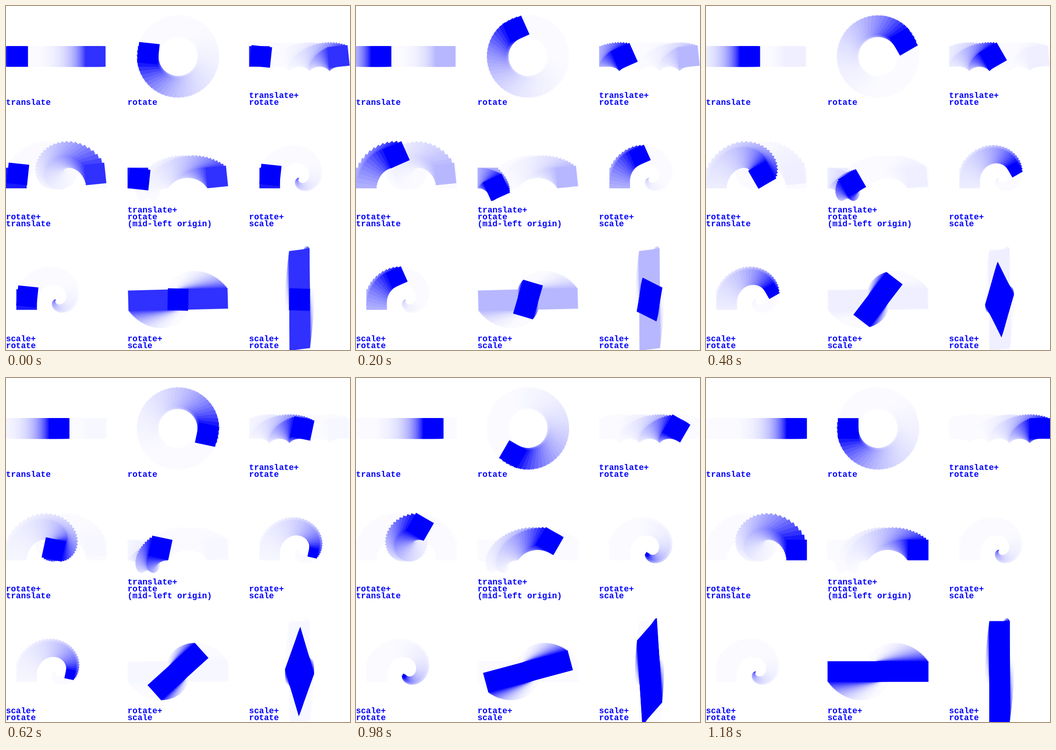
Recreate the animation shown at these times as an HTML page with a canvas. Size 748 by 748 pixels, loop 1200 ms.

```html
<!DOCTYPE html>
<html lang="en">
<head>
<meta charset="utf-8">
<title>Transform order</title>
<style>
  html, body { margin: 0; width: 100%; height: 100%; overflow: hidden; background: #fff; }
  canvas { position: absolute; left: 0; top: 0; }
  .label {
    position: absolute;
    margin: 0;
    transform: translateY(-100%);
    font: bold 18px/15px "Courier New", Courier, "Liberation Mono", monospace;
    color: #00f;
    white-space: pre;
  }
</style>
</head>
<body>
<canvas id="stage" width="748" height="748"></canvas>
<script>
const STAGE = 748;
const SIDE = STAGE * 0.06;               // square, and gap between cells
const CELL = (STAGE - 2 * SIDE) / 3;
const PITCH = CELL + SIDE;
const TRAVEL = CELL - SIDE;
const ORBIT = CELL / 2 - SIDE;
const STEPS = 60, STEP_MS = 20;
const KEEP = 0.9;      // share of ink left after each step
const PALEST = 250;    // trails never fade beyond this

const canvas = document.getElementById('stage');
const ctx = canvas.getContext('2d');
const turn = p => ctx.rotate(p * 2 * Math.PI);
const slide = p => TRAVEL * (p - 0.5);
const stretch = p => ctx.scale(1, 1 + (CELL / SIDE - 1) * p);
const square = x => ctx.fillRect(x - SIDE / 2, -SIDE / 2, SIDE, SIDE);

function spiral(p) {
  if (p === 1) return;
  turn(p);
  ctx.scale(1 - p, 1 - p);
  square(-ORBIT);
}

// Each cell draws its square relative to the cell centre, p runs from 0 to 1.
const cells = [
  ['translate', p => square(slide(p))],
  ['rotate', p => { turn(p); square(-ORBIT); }],
  ['translate+\nrotate', p => { ctx.translate(slide(p), 0); turn(p); square(0); }],
  ['rotate+\ntranslate', p => { turn(p); square(slide(p)); }],
  ['translate+\nrotate\n(mid-left origin)', p => {
    ctx.translate(slide(p) - SIDE / 2, 0);
    turn(p);
    square(SIDE / 2);
  }],
  ['rotate+\nscale', spiral],
  ['scale+\nrotate', spiral],
  ['rotate+\nscale', p => { turn(p / 4); stretch(p); square(0); }],
  ['scale+\nrotate', p => { stretch(p); turn(p / 4); square(0); }]
];

const left = i => i % 3 * PITCH;
const top_ = i => Math.floor(i / 3) * PITCH;

cells.forEach(([text], i) => {
  const label = document.createElement('p');
  label.className = 'label';
  label.textContent = text;
  label.style.left = left(i) + 'px';
  label.style.top = top_(i) + 218 + 'px';
  document.body.append(label);
});

function drawPose(step, age) {
  const v = Math.min(PALEST, Math.round(255 * (1 - KEEP ** age)));
  ctx.fillStyle = `rgb(${v},${v},255)`;
  cells.forEach(([, draw], i) => {
    ctx.setTransform(1, 0, 0, 1, left(i) + CELL / 2, top_(i) + CELL / 2);
    draw(step / STEPS);
  });
}

function render(ms) {
  const now = Math.floor(ms / STEP_MS) % STEPS + 1;
  ctx.setTransform(1, 0, 0, 1, 0, 0);
  ctx.fillStyle = '#fff';
  ctx.fillRect(0, 0, STAGE, STAGE);
  drawPose(STEPS, STEPS);
  for (let age = STEPS; age > 0; age--) drawPose((now - age + STEPS) % STEPS, age);
  drawPose(now, 0);
}

const start = performance.now();
function tick() {
  render(performance.now() - start);
  requestAnimationFrame(tick);
}
tick();
</script>
</body>
</html>
```
